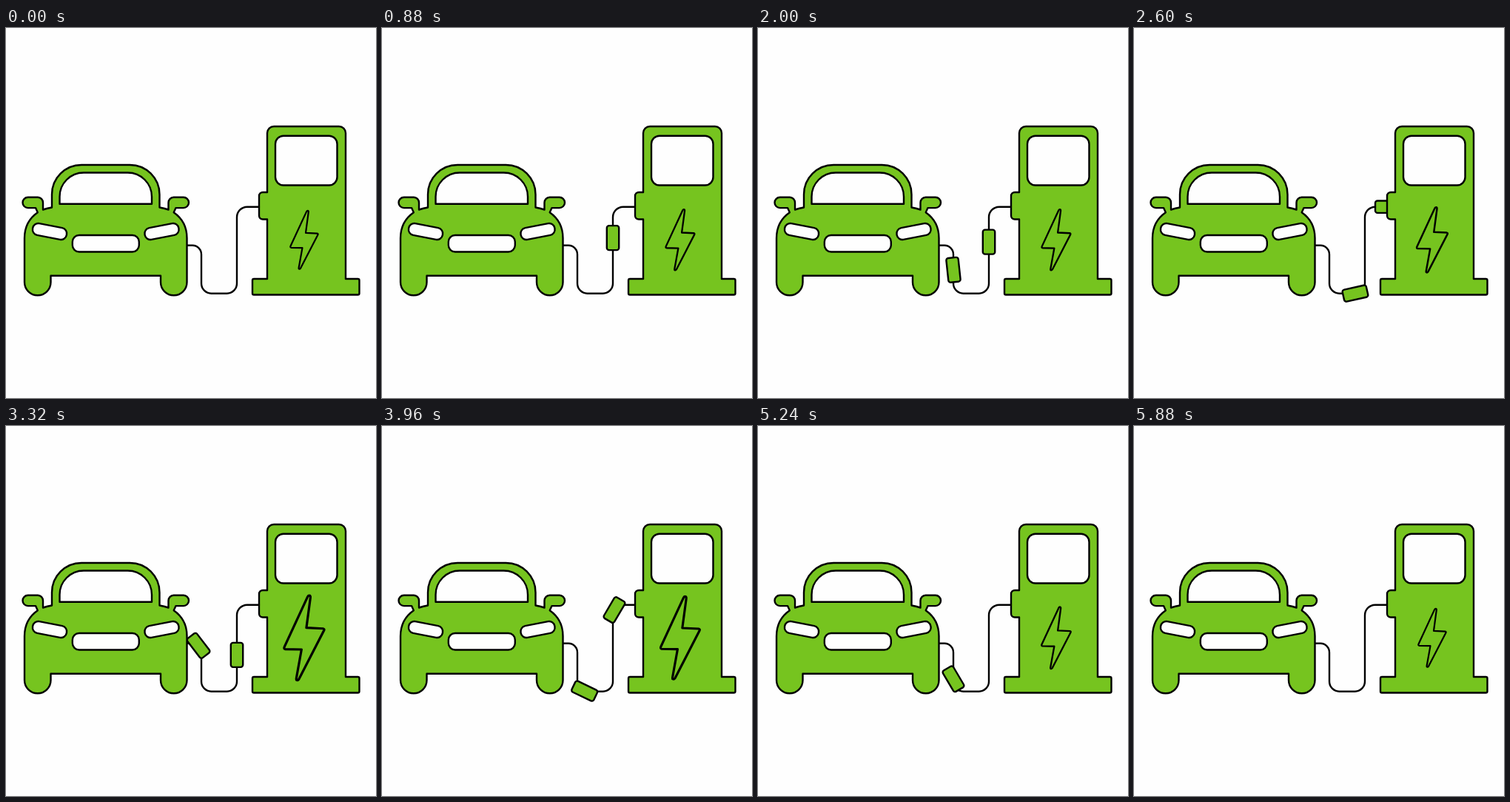
These frames come from a looping animation (500x500 px, 6.04 s). An HTML page:

```html
<!DOCTYPE html>
<html lang="en">
<head>
<meta charset="utf-8">
<title>Charging car</title>
<style>
  html, body { margin: 0; height: 100%; overflow: hidden; background: #fefefe; }
  svg { display: block; width: 100%; height: 100%; fill: #76c41f; stroke: #000; stroke-width: 2.4; stroke-linejoin: round; }
  .clear { fill: #fefefe; }
</style>
</head>
<body>
<svg viewBox="0 0 500 500">
  <path id="cable" fill="none" d="M362 241.7H326A14 14 0 0 0 312 256V345A13.5 13.5 0 0 1 298.5 358.7H277.5A13.5 13.5 0 0 1 264 345V306A12 12.3 0 0 0 252 293.7H205"/>
  <g id="packets"></g>

  <path d="M62 242.5V225A40 40 0 0 1 102 185H167.5A40 40 0 0 1 207.5 225V242.5Q213.5 243.5 219.5 245.5V236a7 7.3 0 0 1 7-7.3H239.8a7.2 7.2 0 0 1 0 14.4H229.5L226.7 249.2C238 257 244.5 268 244.5 284V343.5A17.75 17.75 0 0 1 209 343.5V334.7H60.5V343.5A17.75 17.75 0 0 1 25 343.5V284C25 268 31.5 257 42.8 249.2L40 243.1H29.7a7.2 7.2 0 0 1 0-14.4H43a7 7.3 0 0 1 7 7.3V245.5Q56 243.5 62 242.5Z"/>
  <g class="clear">
    <path d="M72.5 237.8V228A32.5 32.5 0 0 1 105 195.5H164.5A32.5 32.5 0 0 1 197 228V237.8Z"/>
    <rect x="35.7" y="267" width="46.6" height="16" rx="7.5" transform="rotate(11 59 275)"/>
    <rect x="187.2" y="267" width="46.6" height="16" rx="7.5" transform="rotate(-11 210.5 275)"/>
    <rect x="89.8" y="280" width="90" height="22.5" rx="9"/>
  </g>

  <path d="M353 339V258.5H347a5 5 0 0 1-5-5V227a5 5 0 0 1 5-5H353V142a9 9 0 0 1 9-9H450a9 9 0 0 1 9 9V339H475.5a2 2 0 0 1 2 2V358.5a2 2 0 0 1-2 2H335a2 2 0 0 1-2-2V341a2 2 0 0 1 2-2Z"/>
  <rect class="clear" x="364" y="145.7" width="83.5" height="66.8" rx="11"/>
  <path id="bolt" stroke-width="2.2" d="M3.2-38.3Q4-39.8 5.4-39.2Q6-38.6 5.8-37.5L2-9.3L17.5-8.6Q19.2-8.2 18.4-6.8L-5 38.6Q-6 40-7.3 39.2L-7.4 38L-2.5 10.9L-17.7 10.6Q-19.2 10.2-18.5 8.6Z"/>
</svg>
<script>
  const LOOP = 6040, STEP = 40, SPEED = 0.128;
  const PULSE_START = 265, PULSE = 560, PULSE_COUNT = 10;
  const starts = [365, 1442, 2604, 3722];
  // [distance from the pump, packet angle]
  const turns = [[8, 0], [42, -90], [113, -90], [154, 0], [158, 0], [213, 90], [230, 90], [255, 0]];

  const cable = document.getElementById('cable');
  const bolt = document.getElementById('bolt');
  const group = document.getElementById('packets');
  const attrs = { x: -16.5, y: -8.2, width: 33, height: 16.4, rx: 3 };

  const packets = starts.map(() => {
    const rect = document.createElementNS('http://www.w3.org/2000/svg', 'rect');
    for (const name in attrs) rect.setAttribute(name, attrs[name]);
    return group.appendChild(rect);
  });

  function angleAt(s) {
    const i = turns.findIndex(turn => s < turn[0]);
    if (i < 1) return 0;
    const [s0, a0] = turns[i - 1], [s1, a1] = turns[i];
    return a0 + (a1 - a0) * (s - s0) / (s1 - s0);
  }

  function draw(t) {
    packets.forEach((rect, i) => {
      const s = (t - starts[i]) * SPEED;
      const p = cable.getPointAtLength(s + 20);
      rect.style.display = s > -13 && s < 276 ? '' : 'none';
      rect.setAttribute('transform', `translate(${p.x} ${p.y}) rotate(${angleAt(s)})`);
    });
    const phase = Math.min(Math.max((t - PULSE_START) / PULSE, 0), PULSE_COUNT);
    const scale = 1 + 0.23 * (1 - Math.cos(phase * 2 * Math.PI));
    bolt.setAttribute('transform', `translate(403 286.2) scale(${scale})`);
  }

  function tick() {
    const t = performance.now() % LOOP;
    draw(Math.floor(t / STEP) * STEP);
    requestAnimationFrame(tick);
  }
  tick();
</script>
</body>
</html>
```
